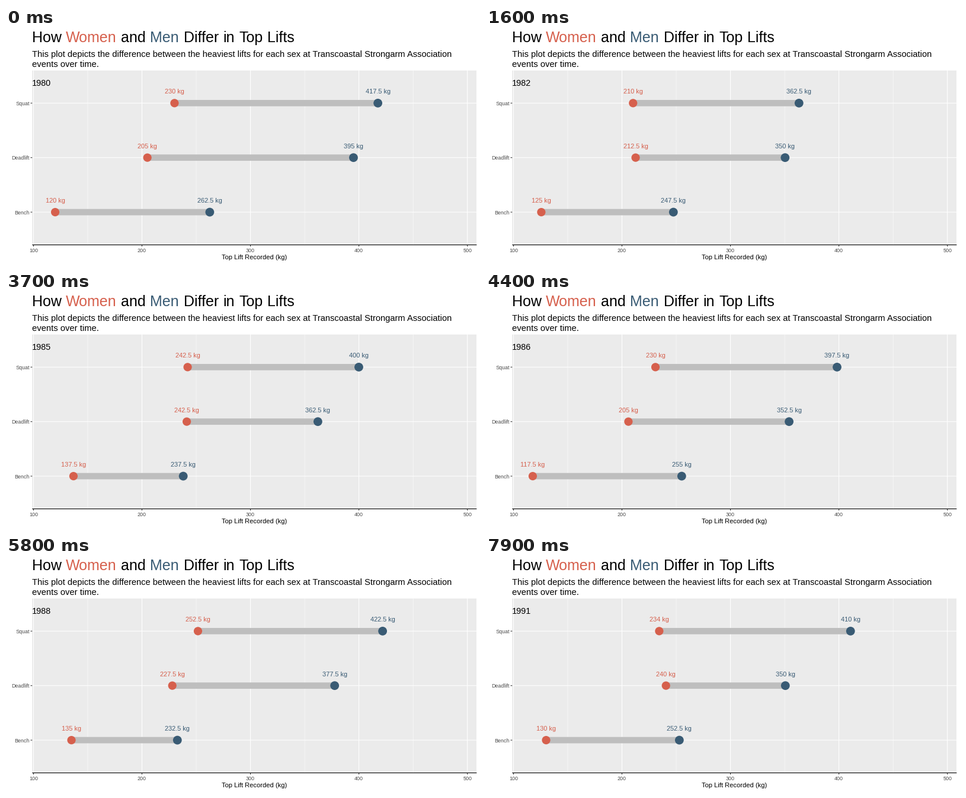
These frames come from a looping animation (800x400 px, 8000 ms). A matplotlib script:

```python
import matplotlib.pyplot as plt
import numpy as np
from matplotlib.animation import FuncAnimation
from matplotlib.patches import Circle, Rectangle

W, H, DPI = 800, 400, 100
FRAMES, INTERVAL = 80, 100
CYCLE, MOVE = 7, 5            # frames per year, steps per move

RED, BLUE = "#D6604D", "#395B74"
LEFT, RIGHT, TOP, BOTTOM = 44.3, 794.4, 71.9, 367.6
ROWS = {"Squat": 127.3, "Deadlift": 219.7, "Bench": 312.1}
FIRST_YEAR = 1980

# Best lifts per year: women, men for squat, deadlift and bench
LIFTS = np.array([
    [230, 417.5, 205, 395, 120, 262.5],
    [215, 427.5, 230, 367.5, 150, 245],
    [210, 362.5, 212.5, 350, 125, 247.5],
    [217.5, 385, 215, 362.5, 145, 245],
    [225, 400, 242.5, 360, 137.5, 272.5],
    [242.5, 400, 242.5, 362.5, 137.5, 237.5],
    [230, 397.5, 205, 352.5, 117.5, 255],
    [257.5, 422.5, 235, 402.5, 125, 257.5],
    [252.5, 422.5, 227.5, 377.5, 135, 232.5],
    [225, 402.5, 242.5, 382.5, 135, 237.5],
    [230, 413, 237.5, 365, 132.5, 245],
    [234, 410, 240, 350, 130, 252.5],
    [245, 432.5, 257.5, 370, 132.5, 265],
])

plt.rcParams["font.family"] = "Liberation Sans"
fig = plt.figure(figsize=(W / DPI, H / DPI), dpi=DPI, facecolor="white")
ax = fig.add_axes([0, 0, 1, 1])
ax.set_xlim(0, W)
ax.set_ylim(H, 0)
ax.axis("off")


def kg_x(kg):
    return 46.4 + 1.8307 * (kg - 100)


def line(x, y, color, width, z=1):
    return ax.plot(x, y, color=color, lw=width * 72 / DPI, zorder=z,
                   solid_capstyle="butt", snap=False)[0]


def text(x, y, s, size, color="black", ha="left"):
    return ax.text(x, y, s, fontsize=size, color=color, ha=ha,
                   va="baseline", zorder=6)


def draw_headings():
    words = [(44, "How", "black"), (101, "Women", RED), (194, "and", "black"),
             (243, "Men", BLUE), (300, "Differ", "black"), (366, "in", "black"),
             (393, "Top", "black"), (441, "Lifts", "black")]
    for x, word, color in words:
        text(x, 24, word, 18, color)
    text(44, 49, "This plot depicts the difference between the heaviest lifts "
         "for each sex at Transcoastal Strongarm Association", 10.55)
    text(44, 66, "events over time.", 10.6)


def draw_panel():
    ax.add_patch(Rectangle((LEFT, TOP), RIGHT - LEFT, BOTTOM - TOP,
                           color="#EBEBEB", lw=0, zorder=0))
    for kg in range(150, 500, 100):
        line([kg_x(kg)] * 2, [TOP, BOTTOM], "white", 0.54)
    for kg in range(100, 501, 100):
        x = kg_x(kg)
        line([x, x], [TOP, BOTTOM], "white", 1.08)
        line([x, x], [BOTTOM, BOTTOM + 2.8], "#333333", 1.08)
        text(x, 380, str(kg), 6.4, "#4D4D4D", "center")
    for name, y in ROWS.items():
        line([LEFT, RIGHT], [y, y], "white", 1.08)
        line([LEFT - 2.8, LEFT], [y, y], "#333333", 1.08)
        text(39.6, round(y + 3.7), name, 6.4, "#4D4D4D", "right")
    line([LEFT, RIGHT], [BOTTOM, BOTTOM], "black", 1.08, 2)
    text(419.4, 392, "Top Lift Recorded (kg)", 8, ha="center")


draw_headings()
draw_panel()
year = text(44, 98, "", 10.4)

bars, dots, labels = [], [], []
for y in ROWS.values():
    bars.append(line([0, 0], [y, y], "#BEBEBE", 10.7, 3))
    for color, radius in ((RED, 7.1), (BLUE, 7.4)):
        dots.append(ax.add_patch(Circle((0, y), radius, facecolor=color,
                                        lw=0, zorder=4)))
        labels.append(text(0, round(y - 16), "", 7.9, color, "center"))


def cubic_in_out(p):
    return 4 * p**3 if p < 0.5 else 1 - 4 * (1 - p)**3


def update(frame):
    state, step = divmod(max(frame - 1, 0), CYCLE)
    p = min(step / MOVE, 1)
    old, new = LIFTS[state], LIFTS[state + 1]
    xs = kg_x(old + (new - old) * cubic_in_out(p))

    # Wording switches halfway through the move
    shown = state + (p >= 0.5)
    year.set_text(str(FIRST_YEAR + shown))
    for x, kg, dot, label in zip(xs, LIFTS[shown], dots, labels):
        dot.center = (x, dot.center[1])
        label.set_x(x)
        label.set_text(f"{kg:g} kg")
    for bar, ends in zip(bars, xs.reshape(3, 2)):
        bar.set_xdata(ends)
    return [year, *bars, *dots, *labels]


anim = FuncAnimation(fig, update, frames=FRAMES, interval=INTERVAL,
                     init_func=lambda: update(0), repeat=True,
                     repeat_delay=0, blit=False)
plt.show()
```
